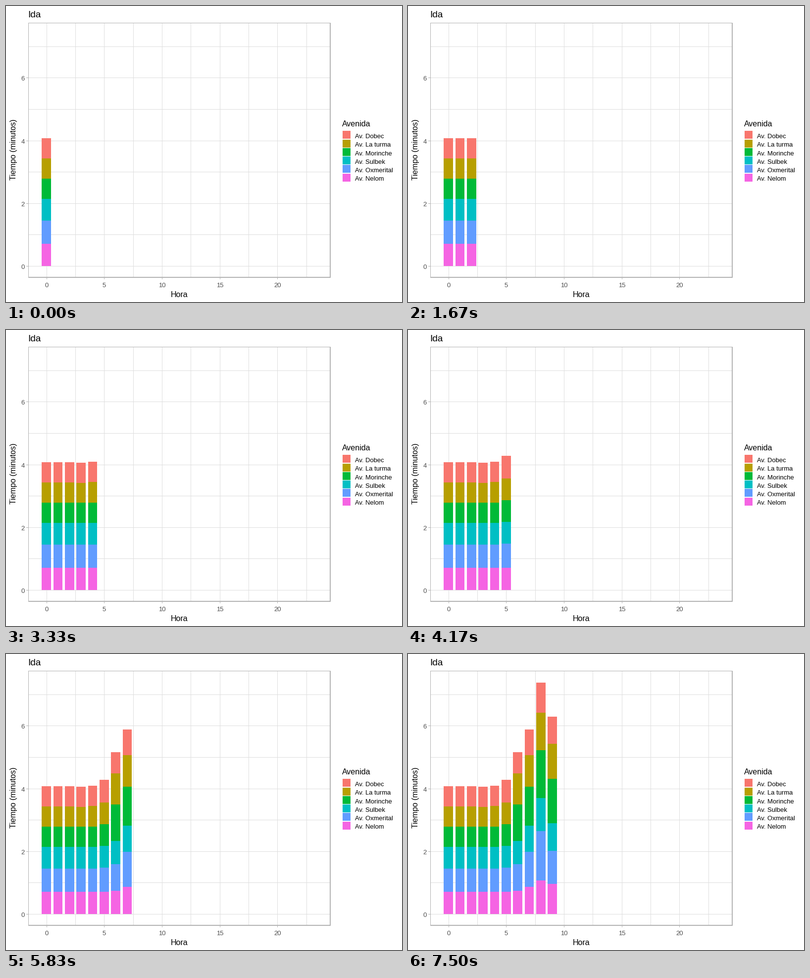
Write a matplotlib script that moves like this. It is 800x600 px and loops after 8000 ms.

```python
import matplotlib.pyplot as plt
from matplotlib.animation import FuncAnimation
from matplotlib.patches import Rectangle

WIDTH, HEIGHT, DPI = 800, 600, 100
INTERVAL = 64          # ms per frame
FRAMES = 125           # 125 * 64 ms = 8 s
FRAMES_PER_HOUR = 13   # a new bar about every 832 ms

X0, X_UNIT = 81.6, 23.33
Y0, Y_UNIT = 527, 63.6
LEFT, TOP, RIGHT, BOTTOM = 45, 34, 656, 551

GRID, BORDER, TICK_TEXT = "#DEDEDE", "#B3B3B3", "#4D4D4D"

STREETS = [
    ("Av. Dobec", "#F8766D"),
    ("Av. La turma", "#B79F00"),
    ("Av. Morinche", "#00BA38"),
    ("Av. Sulbek", "#00BFC4"),
    ("Av. Oxmerital", "#619CFF"),
    ("Av. Nelom", "#F564E3"),
]

# Top edge of each segment in pixels, first street to last
NIGHT = (268, 309, 350, 391, 435, 482)
TOPS = [
    NIGHT,
    NIGHT,
    NIGHT,
    (269, 310, 350, 391, 435, 482),
    (267, 308, 350, 391, 435, 482),
    (255, 301, 345, 389, 433, 482),
    (199, 242, 305, 379, 426, 480),
    (153, 205, 269, 348, 401, 472),
    (58, 119, 195, 292, 359, 459),
    (127, 182, 253, 343, 399, 466),
]

plt.rcParams["font.family"] = "Liberation Sans"
fig = plt.figure(figsize=(WIDTH / DPI, HEIGHT / DPI), dpi=DPI, facecolor="white")
ax = fig.add_axes([0, 0, 1, 1])
ax.set_xlim(0, WIDTH)
ax.set_ylim(HEIGHT, 0)
ax.axis("off")


def px(hour):
    return round(X0 + X_UNIT * hour)


def py(minutes):
    return round(Y0 - Y_UNIT * minutes)


def box(x0, y0, x1, y1, color):
    patch = Rectangle((x0, y0), x1 - x0, y1 - y0, facecolor=color,
                      linewidth=0, antialiased=False)
    return ax.add_patch(patch)


def label(x, y, text, size, color="black", ha="left", rotation=0):
    ax.text(x, y, text, fontsize=size * 72 / DPI, color=color, ha=ha,
            va="baseline", rotation=rotation, rotation_mode="anchor")


def draw_grid():
    for i in range(10):
        x = px(2.5 * i)
        box(x, TOP, x + 1, BOTTOM, GRID)
    for minutes in range(8):
        y = py(minutes)
        box(LEFT, y, RIGHT, y + 1, GRID)


def draw_axes():
    box(LEFT, TOP, LEFT + 1, BOTTOM, BORDER)
    box(LEFT, TOP, RIGHT, TOP + 1, BORDER)
    box(RIGHT - 2, TOP, RIGHT, BOTTOM, BORDER)
    box(LEFT, BOTTOM - 2, RIGHT, BOTTOM, BORDER)
    for hour in range(0, 21, 5):
        x = px(hour)
        box(x, BOTTOM, x + 1, BOTTOM + 3, BORDER)
        label(x + 0.5, 570, str(hour), 13, TICK_TEXT, "center")
    for minutes in range(0, 7, 2):
        y = py(minutes)
        box(LEFT - 4, y, LEFT, y + 1, BORDER)
        label(37.5, y + 6, str(minutes), 13, TICK_TEXT, "right")
    label(44.5, 23, "Ida", 19)
    label(350, 590, "Hora", 16, ha="center")
    label(20.5, 291.5, "Tiempo (minutos)", 16, ha="center", rotation=90)


def draw_legend():
    label(679, 244, "Avenida", 16)
    for i, (name, color) in enumerate(STREETS):
        y = round(253.3 + 17.28 * i)
        box(680, y, 696, y + 16, color)
        label(705, round(268 + 17.28 * i), name, 13)


def make_bar(hour, tops):
    left, right = (px(hour + side) for side in (-0.4, 0.4))
    bottoms = tops[1:] + (Y0,)
    return [box(left, top, right, bottom, color)
            for top, bottom, (_, color) in zip(tops, bottoms, STREETS)]


draw_grid()
bars = [make_bar(hour, tops) for hour, tops in enumerate(TOPS)]
draw_axes()
draw_legend()


def update(frame):
    current = frame // FRAMES_PER_HOUR
    for hour, bar in enumerate(bars):
        for segment in bar:
            segment.set_visible(hour <= current)
    return [segment for bar in bars for segment in bar]


anim = FuncAnimation(fig, update, frames=FRAMES, interval=INTERVAL,
                     init_func=lambda: update(0), repeat=True, repeat_delay=0)
plt.show()
```
